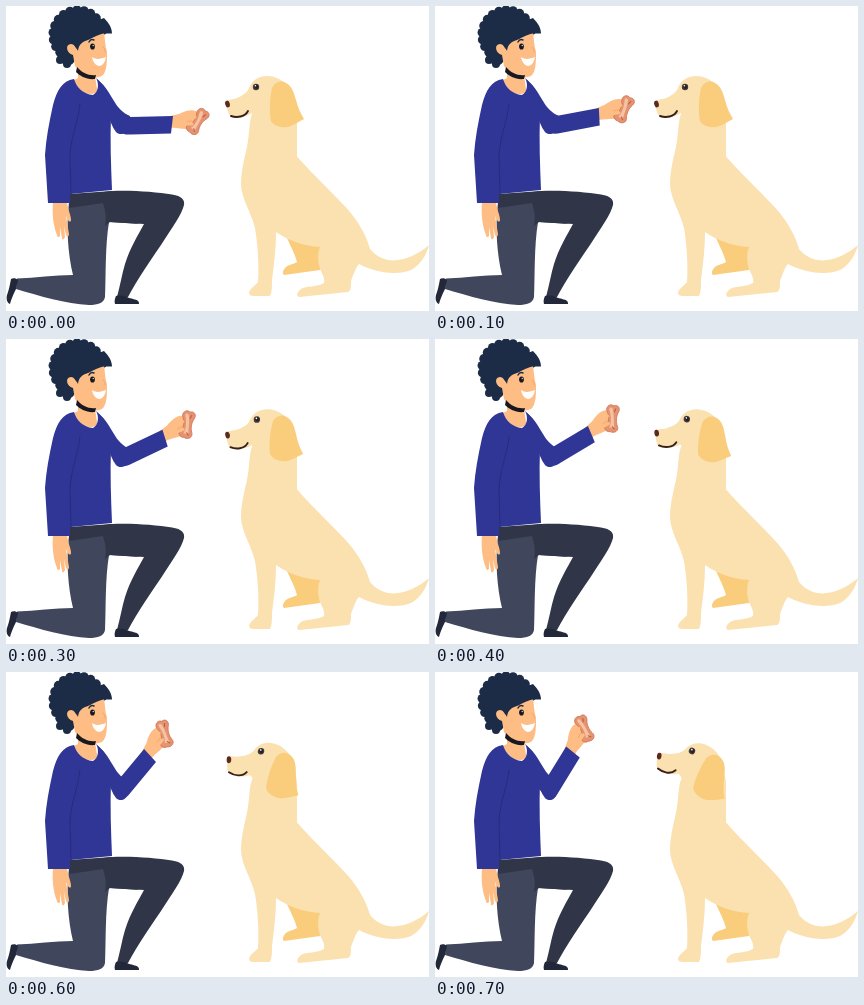
An HTML page with a canvas for the animation above (1.2 s loop, 423 by 305 pixels).

```html
<!DOCTYPE html>
<html lang="en">
<head>
<meta charset="utf-8">
<title>Dog training</title>
<style>
html, body { margin: 0; width: 100%; height: 100%; overflow: hidden; background: #fff; }
canvas { display: block; width: 423px; height: 305px; }
</style>
</head>
<body>
<canvas id="stage"></canvas>
<script>
const W = 423, H = 305, LOOP = 1200, STEP = 100;
const canvas = document.getElementById('stage');
const ctx = canvas.getContext('2d');
const dpr = window.devicePixelRatio || 1;
canvas.width = Math.round(W * dpr);
canvas.height = Math.round(H * dpr);

const SKIN = '#fdbd85', SKIN_DARK = '#ef9a63', HAIR = '#1d2c46';
const SHIRT = '#303695', SEAM = '#282b7c';
const PANTS = '#303648', PANTS_LIGHT = '#40465b', SHOE = '#22283a';
const FUR = '#fbe0b0', FUR_DARK = '#f9cd7b', NOSE = '#5a2a1c';

// Pose in degrees for each step; the last one is held.
const ARM = [0, 9.4, 18.8, 24, 29.5, 40, 49, 57];
const HEAD = [0, 0, 1, 3, 6, 13, 16, 22];

function fill(d, color) {
  ctx.fillStyle = color;
  ctx.fill(new Path2D(d));
}

function line(d, color, width) {
  ctx.strokeStyle = color;
  ctx.lineWidth = width;
  ctx.lineCap = ctx.lineJoin = 'round';
  ctx.stroke(new Path2D(d));
}

function oval(x, y, rx, ry, color, tilt = 0) {
  ctx.fillStyle = color;
  ctx.beginPath();
  ctx.ellipse(x, y, rx, ry, tilt, 0, Math.PI * 2);
  ctx.fill();
}

function turned(x, y, deg, draw) {
  ctx.save();
  ctx.translate(x, y);
  ctx.rotate(deg * Math.PI / 180);
  ctx.translate(-x, -y);
  draw();
  ctx.restore();
}

function legs() {
  fill('M64 190L106 185C126 184 150 186 166 188.5C176 190 179 194 178 199C176 208 166 222 155 239C146 252 131 274 122 291L111 291C114 280 116 268 119 258C124 242 132 229 138 218L103 216L70 215Z', PANTS);
  fill('M63 196L98 195L103 216C99 240 100 270 99 291C98 297 92 299 83 299C60 298 34 290 10 283L11 272.5C30 272 48 269 67 269C62 248 60 222 63 196Z', PANTS_LIGHT);
  fill('M63 188L106 185L106 199C110 209 118 214 134 218L104 216L99 220C101 210 99 204 97 197L63 202Z', PANTS);
  fill('M12 274L10 283C7 289 5 294 4 298C1 297 0 293 1 289C3 284 4 278 5 273C7 272 10 272 12 274Z', SHOE);
  fill('M110 290C114 289 118 290 121 291C125 293 130 293 132 295C133 296 133 297 133 298L109 298C108 295 109 292 110 290Z', SHOE);
}

function face() {
  for (let i = 0; i <= 14; i++) {
    const a = (120 + i * 16.4) * Math.PI / 180;
    oval(72 + 25 * Math.cos(a), 29 + 25 * Math.sin(a), 4.6, 4.6, HAIR);
  }
  oval(72, 28, 25, 25, HAIR);
  oval(60, 48, 9, 12, HAIR, -0.4);
  oval(54, 54, 4, 4, HAIR);
  oval(61, 58, 4, 4, HAIR);
  fill('M72 52L72 72L68 74C72 83 78 88 84 88C89 88 92 86 91 83L89 70Z', SKIN);
  fill('M80 26L98 26C99 33 99 40 101 46C101 56 101 66 96 70C88 74 76 69 69 60L67 49C60 47 59 38 65 38C68 38 69 41 71 43Z', SKIN);
  fill('M66 34L72 45C73 38 76 36 82 34C88 31 94 28 98 27.5L106 27.5C106 22 103 17 98 12L76 20Z', HAIR);
  fill('M71 61C76 67 83 70 90 69L89 73C81 74 74 70 70 66Z', '#171821');
  line('M83 36C84 34 86 33 88 34', HAIR, 1.5);
  oval(86.5, 40.5, 2.4, 3.1, '#171821');
  oval(87.2, 39.5, 0.6, 0.7, '#fff');
  line('M97 41C99 43 100 45 99 46', SKIN_DARK, 0.7);
  fill('M86 51C90 54 95 53 100 51C99 57 96 60 93 60C89 59 87 56 86 51Z', '#fff');
}

function torso() {
  fill('M47 196L61 196C62 204 65 209 65 214C65 216 63 216 62 214L60 210L63 228C63 231 61 231 60 229L58 220L59 231C58 234 56 234 56 232L54 221L54 230C53 232 51 231 51 229C47 219 46 207 47 196Z', SKIN);
  fill('M68 73C56 75 51 84 47 99C43 117 40 133 39 149L42 197L64 197L64 188L106 184C105 160 104 135 105 108L106 96C103 86 97 78 90 72C93 77 93 86 87 89C77 88 71 82 68 73Z', SHIRT);
  line('M74 98C72 116 65 130 64 150L65 188', SEAM, 1);
}

function bone() {
  ctx.save();
  ctx.translate(191.5, 115.5);
  ctx.rotate(-0.98);
  const d = 'M-6 -4C-8 -9 -14 -6 -13 -1C-15 4 -11 8 -7 6C-3 4 3 4 7 6C11 8 15 5 13 1C16 -4 10 -8 6 -5C3 -3 -3 -3 -6 -4Z';
  fill(d, '#e59370');
  fill('M-9 -2C-5 0 3 -1 8 -3C11 -4 12 -2 10 0C4 2 -4 2 -9 3Z', '#f5c3a1');
  line(d, '#cf7655', 0.8);
  line('M-10 3L-8 1M7 2L10 3', '#bd5e43', 1.1);
  ctx.restore();
}

function arm(deg) {
  fill('M92 74C100 80 104 89 108 95C112 102 117 107 124 110L122 122C120 128 114 130 110 126C106 121 104 114 102 108Z', SHIRT);
  turned(116.3, 125.2, -deg, () => {
    fill('M164 110L173 108C179 105 185 103 190 105C194 109 192 114 191 118C189 124 184 126 180 123C175 123 170 121 164 122Z', SKIN);
    bone();
    line('M179 113C183 112 186 112 189 111', SKIN, 3);
    line('M180 118L186 118', SKIN, 3);
    line('M181 115.5L186 115', SKIN_DARK, 0.6);
    fill('M117 108C120 110 122 111 125 111L167 110L165 127.5L125 128.5C120 129 116 128 113 125Z', SHIRT);
  });
}

function dogBody() {
  fill('M281 232L315 238L314 264L278 269C276 267 277 264 280 261C284 258 288 258 291 256C289 248 285 241 281 232Z', FUR_DARK);
  fill('M249 102C243 110 244 122 242 135C240 148 235 162 235 178C235 192 246 208 249 222C252 240 253 260 252 276C249 280 244 282 243 287C243 289 245 290 248 290L264 290C266 286 266 280 266 274C268 258 270 243 270 226C283 235 298 240 314 241C311 248 312 257 314 263C317 269 319 273 318 277C312 281 300 280 295 283C291 286 290 290 293 291L342 286C345 285 345 280 345 275C348 267 350 261 353 258C372 268 393 269 405 264C414 259 420 250 423 239C410 250 396 256 382 254C374 252 368 248 364 243C360 229 353 217 344 206C329 189 309 171 291 150.5L291 112C291 100 284 90 270 88L252 92Z', FUR);
}

function dogHead(deg) {
  turned(258.7, 98, deg, () => {
    fill('M220 97C221 93 226 94 231 92C237 89 241 87 243 82C246 74 253 70 261 70C276 70 287 82 289 98C289 113 278 122 265 120C257 118 251 109 246 107C240 111 232 113 225 111C222 108 221 103 220 97Z', FUR);
    oval(221.5, 98, 2.3, 3.4, NOSE, -0.25);
    line('M225 110C231 112 239 111 242 105', '#35201b', 1.9);
    oval(250, 81, 3.2, 3.3, '#4a3d3b');
    oval(250.3, 80.8, 2, 2.2, '#20252d');
    oval(249.4, 79.8, 0.8, 0.8, '#fff');
    fill('M266 82C269 76 275 74 280 77C286 80 288 87 290 94C292 102 295 108 298 113C292 116 288 119 282 121C275 122 268 120 265 115C263 105 264 91 266 82Z', FUR_DARK);
  });
}

function draw(time) {
  const step = Math.min(Math.floor(time % LOOP / STEP), ARM.length - 1);
  ctx.setTransform(dpr, 0, 0, dpr, 0, 0);
  ctx.fillStyle = '#fff';
  ctx.fillRect(0, 0, W, H);
  legs();
  face();
  torso();
  arm(ARM[step]);
  dogBody();
  dogHead(HEAD[step]);
}

let start;
function tick(now) {
  if (start === undefined) start = now;
  draw(Math.max(0, now - start));
  requestAnimationFrame(tick);
}
draw(0);
requestAnimationFrame(tick);
</script>
</body>
</html>
```
